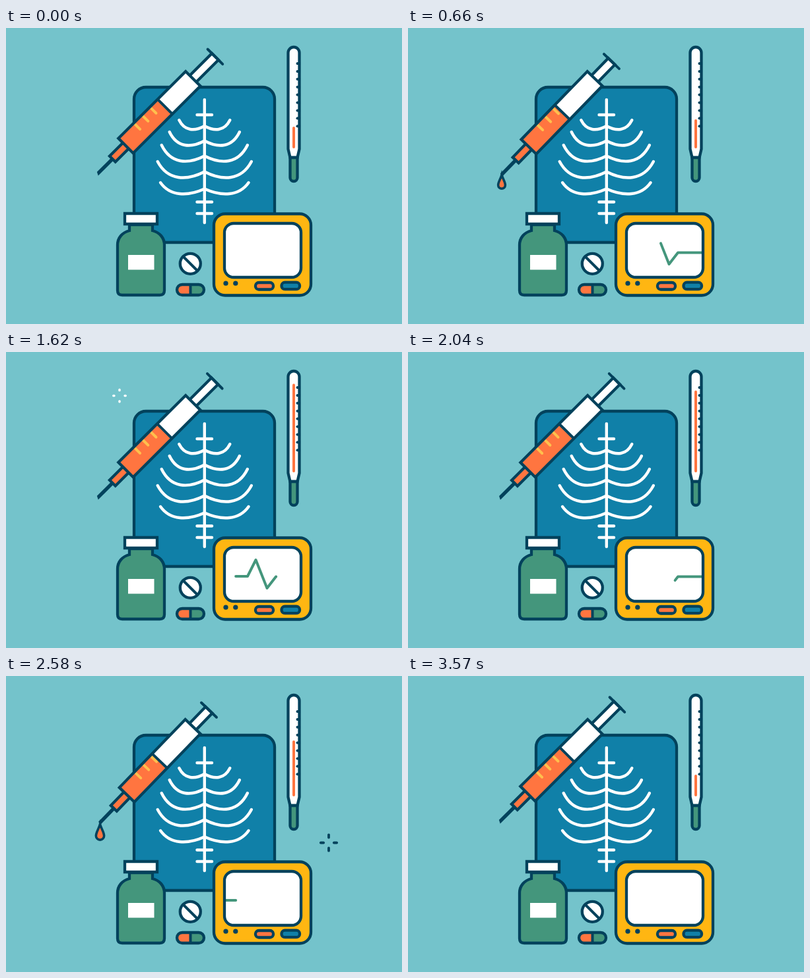
Animation of 600 by 450 pixels, one loop 3600 ms. Source, as an HTML page with a canvas:

```html
<!DOCTYPE html>
<html lang="en">
<head>
<meta charset="utf-8">
<title>Medical kit</title>
<style>
  html, body { margin: 0; width: 100%; height: 100%; overflow: hidden; background: #74c3cb; }
  canvas { display: block; }
</style>
</head>
<body>
<canvas id="stage" width="600" height="450"></canvas>
<script>
const ctx = document.getElementById('stage').getContext('2d');
const LOOP = 3600;
const SKY = '#74c3cb', NAVY = '#02425c', BLUE = '#1080a8', ORANGE = '#ff7540',
      GREEN = '#44967c', YELLOW = '#ffb612', AMBER = '#ffc04d', WHITE = '#fff';

const lerp = (a, b, p) => a + (b - a) * p;
const ramp = (t, from, to) => Math.min(1, Math.max(0, (t - from) / (to - from)));
const ease = (t, from, to) => { const p = ramp(t, from, to); return p * p * (3 - 2 * p); };
const easeOut = p => 1 - (1 - p) ** 3;

function paint(path, fill, stroke = NAVY, width = 4.3) {
  if (fill) { ctx.fillStyle = fill; ctx.fill(path); }
  if (stroke) { ctx.strokeStyle = stroke; ctx.lineWidth = width; ctx.stroke(path); }
}

function box(x, y, w, h, r, fill, stroke = NAVY) {
  const path = new Path2D();
  path.roundRect(x, y, w, h, r);
  paint(path, fill, stroke);
}

function line(x1, y1, x2, y2, color = NAVY, width = 4, cap = 'round') {
  ctx.lineCap = cap;
  ctx.strokeStyle = color;
  ctx.lineWidth = width;
  ctx.beginPath();
  ctx.moveTo(x1, y1);
  ctx.lineTo(x2, y2);
  ctx.stroke();
}

function disc(x, y, r, fill, stroke = NAVY) {
  const path = new Path2D();
  path.arc(x, y, r, 0, Math.PI * 2);
  paint(path, fill, stroke);
}

// Each rib: outer end x and y, lowest y, y where it meets the spine.
const RIBS = [
  [262.3, 140, 154, 149], [247.7, 158, 178, 171.5], [235.7, 178, 202, 194.5],
  [229.7, 203, 227, 218.5], [234, 235, 252, 244.5]
];

function drawXray() {
  const mid = 300.8;
  box(194, 90, 213, 236, 18, BLUE);
  line(mid, 109, mid, 296, WHITE, 4.4);
  for (const y of [132, 264.5, 282]) line(289.5, y, 312, y, WHITE, 4.4);
  ctx.lineCap = 'round';
  for (const [x, y, low, join] of RIBS) {
    const reach = mid - x, bend = (8 * low - y - join) / 6;
    for (const side of [-1, 1]) {
      const path = new Path2D();
      path.moveTo(mid + side * reach, y);
      path.bezierCurveTo(mid + side * reach * 0.78, bend, mid + side * reach * 0.38, bend, mid, join);
      paint(path, null, WHITE, 4.4);
    }
  }
}

function drawThermometer(t) {
  const tube = new Path2D('M430.5 197 L427.5 184 V37.5 A8.5 8.5 0 0 1 444.5 37.5 V184 L441.5 197 Z');
  paint(tube, WHITE);
  box(430.5, 197, 11, 36, [0, 0, 5.5, 5.5], GREEN);
  for (let i = 0; i < 9; i++) line(441.5, 54 + i * 11.9, 444, 54 + i * 11.9);
  const heat = ease(t, 390, 1720) - ease(t, 1640, 3530);
  line(436, 152 - 103.5 * heat, 436, 181, ORANGE);
}

function drawSyringe(t) {
  const beat = t % 1800;
  const press = ease(beat, 120, 800);
  const push = -12.4 * (press - ease(beat, 900, 1760));
  const tilt = -0.0185 * (press - ease(beat, 790, 960));
  const half = 15.8, top = 144, piston = 84 + push, pivot = 125;

  ctx.save();
  ctx.translate(181.5, 179);
  ctx.rotate(-Math.PI / 4);
  ctx.translate(pivot, 0);
  ctx.rotate(tilt);
  ctx.translate(-pivot, 0);

  paint(new Path2D('M-26 -2.7 H-59 L-61.8 2.7 H-26 Z'), NAVY, null);
  box(-28.5, -6.2, 30, 12.4, 0, ORANGE);

  box(130, -7, 61.5 + push, 14, 0, WHITE);
  line(191.5 + push, -16, 191.5 + push, 16);

  box(0, -half, top, half * 2, 0, WHITE, null);
  box(0, -half, piston, half * 2, 0, ORANGE, null);
  for (const x of [33, 50.3, 67.5]) line(x, -13, x, -2.5, AMBER);
  line(piston, -half, piston, half, NAVY, 4, 'butt');
  box(0, -half, top, half * 2, 0, null);
  ctx.restore();
}

function drawDrop(t) {
  const beat = t % 1800;
  if (beat > 250 && beat < 890) {
    const k = 1.13 * Math.sqrt(ramp(beat, 250, 800));
    const fall = ramp(beat, 790, 890) ** 2;
    ctx.save();
    ctx.translate(lerp(140.5, 142.5, ramp(beat, 300, 780)),
                  lerp(216, 223.3, ramp(beat, 300, 800)) + 158 * fall);
    const drop = new Path2D();
    drop.moveTo(0, 2 * k);
    drop.bezierCurveTo(1.5 * k, 8 * k, 5.5 * k, 13 * k, 5.5 * k, 18 * k);
    drop.arc(0, 18 * k, 5.5 * k, 0, Math.PI);
    drop.bezierCurveTo(-5.5 * k, 13 * k, -1.5 * k, 8 * k, 0, 2 * k);
    drop.closePath();
    paint(drop, ORANGE, NAVY, 3.6);
    ctx.restore();
  }
  if (beat >= 890 && beat < 1140) {
    const head = easeOut(ramp(beat, 890, 1060));
    const tail = ramp(beat, 930, 1150) ** 2 * 0.75;
    for (const side of [-1, 1]) {
      const x = p => 137.7 + side * lerp(2, 6.3, p);
      const y = p => lerp(403, 390.5, p);
      line(x(tail), y(tail), x(head), y(head), NAVY, 3.6);
    }
  }
}

function drawSpark(t, start, x, y, radius, color, width) {
  const p = (t - start) / 450;
  if (p <= 0 || p >= 1) return;
  const outer = radius * easeOut(p), inner = Math.min(outer, radius * p ** 1.25);
  for (const [dx, dy] of [[1, 0], [0, 1], [-1, 0], [0, -1]]) {
    line(x + dx * inner, y + dy * inner, x + dx * outer, y + dy * outer, color, width);
  }
}

function drawBottle() {
  const body = new Path2D(`M187 299 V308 C176 311 169 319 169 330 V399 Q169 406 176 406
    H233 Q240 406 240 399 V330 C240 319 233 311 222 308 V299 Z`);
  paint(body, GREEN);
  box(180, 282, 49, 16, 0, WHITE);
  box(185, 345, 39.5, 22.5, 0, WHITE, null);
}

function drawPills() {
  disc(279.3, 358.3, 15.5, WHITE);
  line(268.5, 347.5, 290, 369, NAVY, 4, 'butt');
  box(259, 390, 41, 16, 8, GREEN, null);
  box(259, 390, 20.5, 16, [8, 0, 0, 8], ORANGE, null);
  line(279.5, 390, 279.5, 406);
  box(259, 390, 41, 16, 8, null);
}

const PULSE = [[331, 341], [366, 341], [378.5, 316], [395.5, 359], [409, 341.5], [446, 341.5]];

// Strokes the part of a polyline between two fractions of its length.
function strokePart(points, from, to) {
  const legs = points.slice(1).map((p, i) => Math.hypot(p[0] - points[i][0], p[1] - points[i][1]));
  const total = legs.reduce((a, b) => a + b);
  const path = new Path2D();
  let walked = 0, started = false;
  legs.forEach((leg, i) => {
    const a = Math.max(0, (from * total - walked) / leg);
    const b = Math.min(1, (to * total - walked) / leg);
    walked += leg;
    if (a >= b) return;
    const at = p => [lerp(points[i][0], points[i + 1][0], p), lerp(points[i][1], points[i + 1][1], p)];
    if (!started) path.moveTo(...at(a));
    started = true;
    path.lineTo(...at(b));
  });
  ctx.lineCap = ctx.lineJoin = 'round';
  paint(path, null, GREEN, 4);
  ctx.lineJoin = 'miter';
}

function drawMonitor(t) {
  box(315, 282.5, 147, 124, 17, YELLOW);
  box(331, 297, 116, 82, 14, WHITE, null);
  const sweep = t % 1200;
  strokePart(PULSE, ease(sweep, 243, 1143), ease(sweep, 86, 566));
  box(331, 297, 116, 82, 14, null);
  disc(333, 388.2, 3.6, NAVY, null);
  disc(347.8, 388.2, 3.6, NAVY, null);
  box(378, 387, 27, 10.5, 5, ORANGE);
  box(417.5, 386.7, 27.5, 10.5, 5, BLUE);
}

function draw(t) {
  ctx.fillStyle = SKY;
  ctx.fillRect(0, 0, 600, 450);
  drawXray();
  drawThermometer(t);
  drawSyringe(t);
  drawDrop(t);
  drawBottle();
  drawPills();
  drawMonitor(t);
  drawSpark(t, 665, 489, 253.5, 12.5, NAVY, 3.8);
  drawSpark(t, 2270, 489, 253.5, 12.5, NAVY, 3.8);
  drawSpark(t, 1215, 172, 66.5, 9.2, WHITE, 3.4);
}

const begin = performance.now();
function tick() {
  draw((performance.now() - begin) % LOOP);
  requestAnimationFrame(tick);
}
tick();
</script>
</body>
</html>
```
